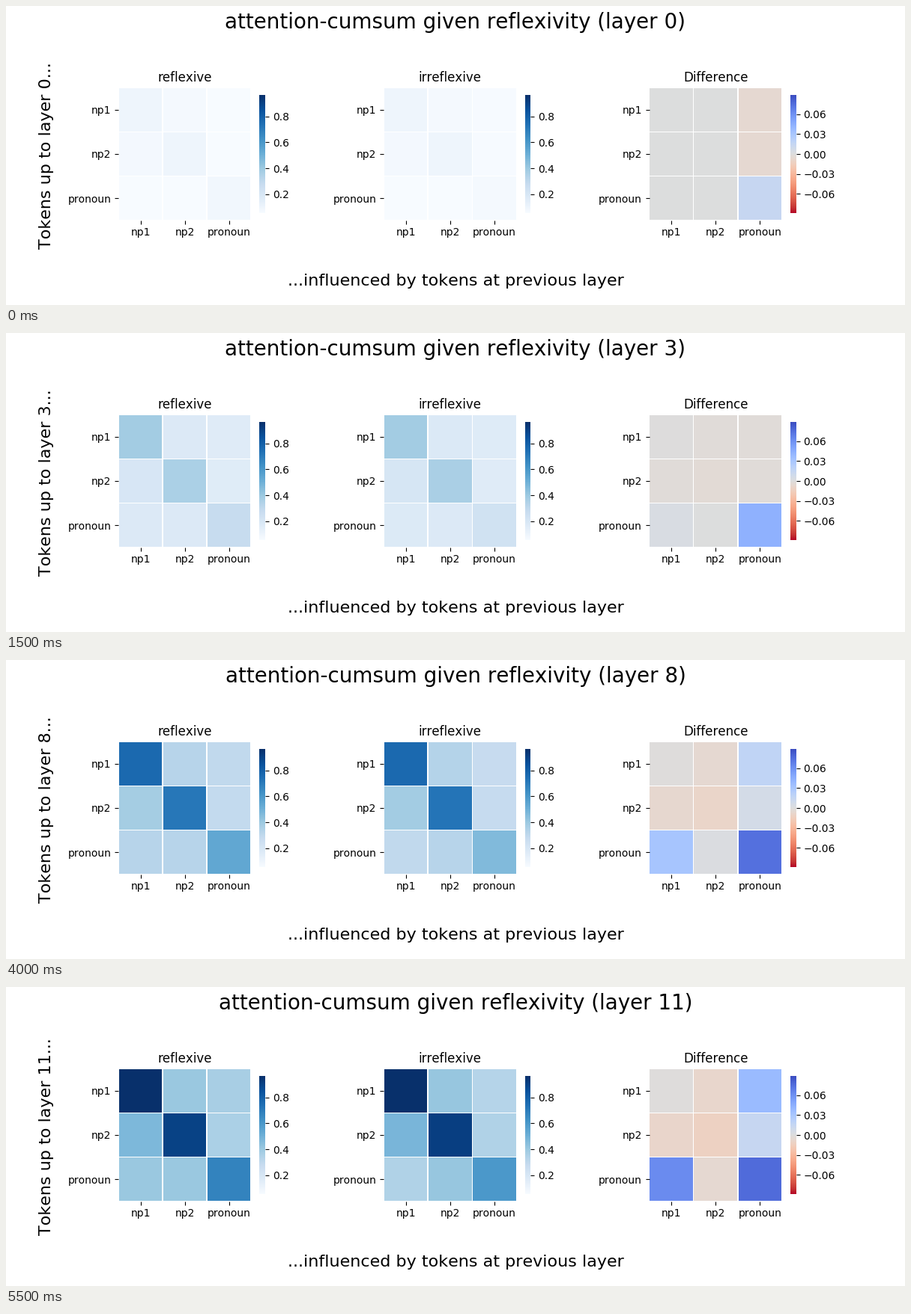
These frames come from a looping animation (1200x400 px, 6000 ms). A matplotlib script:

```python
import matplotlib.pyplot as plt
import numpy as np
from matplotlib.animation import FuncAnimation

plt.rcParams["font.family"] = "DejaVu Sans"
plt.rcParams["text.kerning_factor"] = 6

WIDTH, HEIGHT, DPI = 1200, 400, 100
LAYERS = 12
TOKENS = ["np1", "np2", "pronoun"]
LOW, HIGH, SPREAD = 0.0546, 0.9656, 0.089

# Final attention of each token pair, relative to the strongest one
WEIGHTS = np.array([[1, 0.385, 0.345],
                    [0.455, 0.93, 0.335],
                    [0.385, 0.385, 0.68]])
# Reflexive minus irreflexive: slow drift and late rise, in thousandths
DRIFT = np.array([[-1, -8, 14], [-9, -13, 14], [12, -6, 0]])
LATE = np.array([[0, 0, 30], [0, 0, 6], [50, 0, 0]])


def reflexive_attention(layer):
    growth = np.interp(layer, [0, 3, 5, 11], [0.047, 0.36, 0.56, 1])
    share = WEIGHTS.copy()
    # Links to and from the pronoun only build up over the first layers
    onset = min(layer / 3, 1)
    share[2, :2] *= onset
    share[:2, 2] *= onset
    return LOW + (HIGH - LOW) * growth * share


def reflexive_gap(layer):
    late = np.interp(layer, [7, 9, 11], [0, 0.9, 1])
    gap = DRIFT * layer / (LAYERS - 1) + LATE * late
    gap[:2, 2] -= 6
    gap[2, 1] += 17 * np.exp(-((layer - 6) / 2) ** 2)
    gap[2, 2] = 14 + 62 * np.sin(np.pi / 2 * min(layer / 9.5, 1))
    return gap / 1000


fig = plt.figure(figsize=(WIDTH / DPI, HEIGHT / DPI), dpi=DPI, facecolor="white")

# Three columns, each split into a square map and a half-height colour bar
LEFT, BOTTOM, TOP, WSPACE = 0.125, 0.11, 0.9, 0.6
column = (0.9 - LEFT) / (3 + 2 * WSPACE)
middle = (BOTTOM + TOP) / 2
bar_height = (TOP - BOTTOM) / 2
bar_width = bar_height * HEIGHT / 20 / WIDTH
map_width = column * 0.8
map_height = map_width * WIDTH / HEIGHT


def heatmap(index, title, cmap, vmin, vmax, ticks):
    x = LEFT + index * column * (1 + WSPACE)
    ax = fig.add_axes([x, middle - map_height / 2, map_width, map_height])
    mesh = ax.pcolormesh(np.zeros((3, 3)), cmap=cmap, vmin=vmin, vmax=vmax,
                         edgecolors="white", linewidth=0.5, snap=False)
    ax.set(xlim=(0, 3), ylim=(3, 0))
    ax.set_xticks(np.arange(3) + 0.5, TOKENS)
    ax.set_yticks(np.arange(3) + 0.5, TOKENS)
    ax.set_title(title, fontsize=12)
    ax.spines[:].set_visible(False)

    cax = fig.add_axes([x + column * 0.85, middle - bar_height / 2,
                        bar_width, bar_height])
    bar = fig.colorbar(mesh, cax=cax, ticks=ticks)
    bar.outline.set_visible(False)
    bar.solids.set(edgecolor="none", linewidth=0)
    return mesh


blue_ticks = [0.2, 0.4, 0.6, 0.8]
meshes = [
    heatmap(0, "reflexive", "Blues", LOW, HIGH, blue_ticks),
    heatmap(1, "irreflexive", "Blues", LOW, HIGH, blue_ticks),
    heatmap(2, "Difference", "coolwarm_r", -SPREAD, SPREAD,
            [-0.06, -0.03, 0, 0.03, 0.06]),
]

heading = fig.suptitle("", fontsize=20)
side_label = fig.text(43.6 / WIDTH, 0.5, "", fontsize=16, rotation="vertical",
                      ha="left", va="center")
fig.text(0.5, 26 / HEIGHT, "...influenced by tokens at previous layer",
         fontsize=16, ha="center", va="baseline")


def update(layer):
    heading.set_text(f"attention-cumsum given reflexivity (layer {layer})")
    side_label.set_text(f"Tokens up to layer {layer}...")
    reflexive, gap = reflexive_attention(layer), reflexive_gap(layer)
    for mesh, values in zip(meshes, (reflexive, reflexive - gap, gap)):
        mesh.set_array(values)
    return [heading, side_label, *meshes]


anim = FuncAnimation(fig, update, frames=LAYERS, interval=500,
                     repeat=True, repeat_delay=0, blit=False)
plt.show()
```
